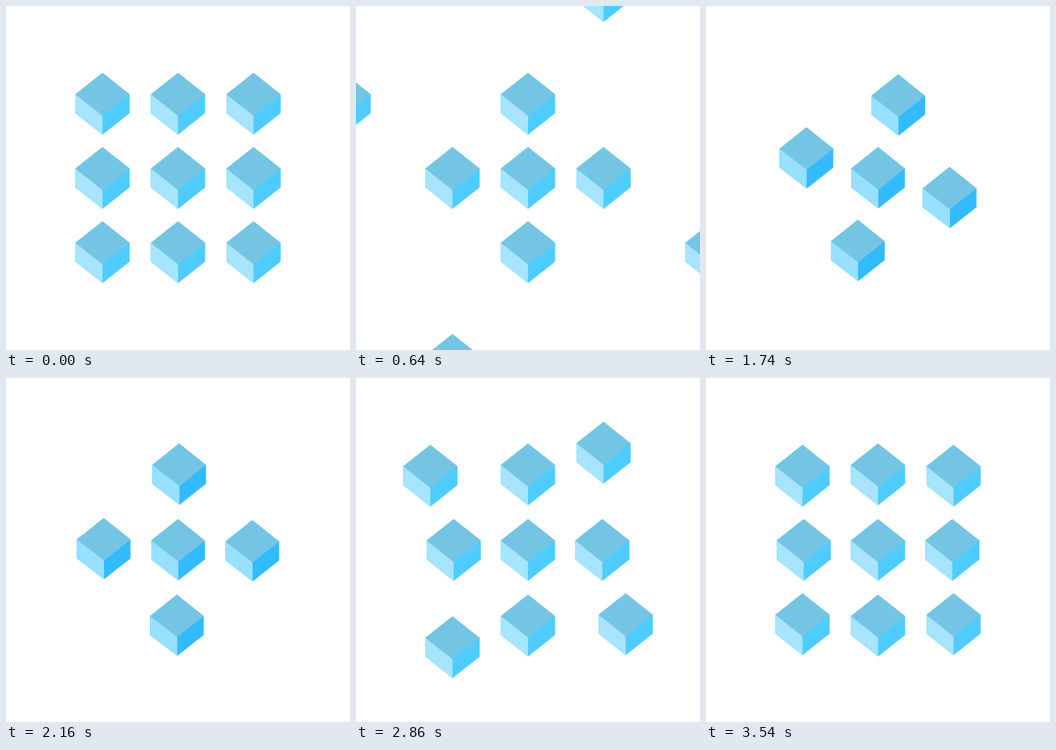
These frames come from a looping animation (512 by 512 pixels, 4.32 s). An HTML page with a canvas:

```html
<!DOCTYPE html>
<html lang="en">
<head>
<meta charset="utf-8">
<title>Cube grid</title>
<style>
  html, body { margin: 0; width: 100%; height: 100%; overflow: hidden; background: #fff; }
  canvas { display: block; width: 100vmin; height: 100vmin; }
</style>
</head>
<body>
<canvas id="stage" width="512" height="512"></canvas>
<script>
const ctx = document.getElementById('stage').getContext('2d');
const LOOP = 4320;
const CENTER = 256;
const STEP_X = 112.4, STEP_Y = 110.6;
const AWAY_X = 184.5, AWAY_Y = 190.8;

const STILL = { half: 40.4, mid: [0, 18], bottom: 46, top: '#74c5e3', left: '#a6e4ff', right: '#4fccff' };
const TURNING = { half: 40, mid: [0.5, 17.2], bottom: 45.2, top: '#74c5e3', left: '#97e0ff', right: '#33bbff' };

// Corners leave in a pinwheel: [column, row, direction x, direction y]
const corners = [[-1, -1, -1, 0], [1, -1, 0, -1], [1, 1, 1, 0], [-1, 1, 0, 1]];
const arms = [[0, -1], [1, 0], [0, 1], [-1, 0]];

// Equivalent to cubic-bezier(.33, 0, 0, 1), solved by bisection
function ease(u) {
  if (u <= 0) return 0;
  if (u >= 1) return 1;
  let low = 0, high = 1, s = 0.5;
  for (let i = 0; i < 24; i++) {
    s = (low + high) / 2;
    if (0.99 * s * (1 - s) ** 2 + s ** 3 < u) low = s;
    else high = s;
  }
  return s * s * (3 - 2 * s);
}

const tween = (time, start, duration) => ease((time - start) / duration);

function polygon(x, y, color, points) {
  ctx.fillStyle = color;
  ctx.beginPath();
  for (const [px, py] of points) ctx.lineTo(x + px, y + py);
  ctx.fill();
}

// Faces overlap underneath one another so that no seams show
function cube(x, y, look) {
  const { half, mid, bottom } = look;
  const top = [0, -46], left = [-half, -14], right = [half, -14];
  const foot = [mid[0], bottom], leftFoot = [-half, 14], rightFoot = [half, 14];
  polygon(x, y, look.right, [top, right, rightFoot, foot, leftFoot, left]);
  polygon(x, y, look.left, [top, mid, foot, leftFoot, left]);
  polygon(x, y, look.top, [top, right, mid, left]);
}

function draw(time) {
  const away = tween(time, 22, 1200) - tween(time, 2328, 1205);
  const angle = -Math.PI / 2 * tween(time, 1260, 1070);
  const look = time >= 1275 && time < 2330 ? TURNING : STILL;
  const cos = Math.cos(angle), sin = Math.sin(angle);

  ctx.fillStyle = '#fff';
  ctx.fillRect(0, 0, 512, 512);

  for (const [column, row, dx, dy] of corners) {
    cube(CENTER + column * STEP_X + dx * AWAY_X * away,
         CENTER + row * STEP_Y + dy * AWAY_Y * away, STILL);
  }
  for (const [column, row] of arms) {
    const x = column * STEP_X, y = row * STEP_Y;
    cube(CENTER + x * cos - y * sin, CENTER + x * sin + y * cos, look);
  }
  cube(CENTER, CENTER, look);
}

const begin = performance.now();
function frame() {
  draw((performance.now() - begin) % LOOP);
  requestAnimationFrame(frame);
}
frame();
</script>
</body>
</html>
```
